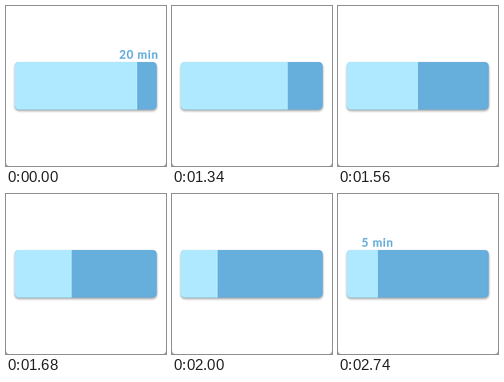
Animation of 200 by 200 pixels, one loop 4080 ms. Source, as an HTML page:

```html
<!DOCTYPE html>
<html lang="en">
<head>
<meta charset="utf-8">
<style>
html, body { margin: 0; width: 100%; height: 100%; overflow: hidden; background: #fff; }
svg { display: block; width: 100%; height: 100%; }
text { font: 700 14.5px Lato, sans-serif; letter-spacing: .8px; fill: #67add9; stroke: #67add9; stroke-width: .2; stroke-linejoin: round; }
</style>
</head>
<body>
<svg viewBox="0 0 200 200">
  <defs>
    <clipPath id="bar"><rect x="11" y="70" width="177.5" height="59.4" rx="5"/></clipPath>
    <filter id="blur" x="-10%" y="-20%" width="120%" height="150%"><feGaussianBlur stdDeviation="1.7"/></filter>
  </defs>
  <rect width="200" height="200" fill="#fff"/>
  <path d="M0 195.5V200H4.5A4.5 4.5 0 0 1 0 195.5ZM200 195.5V200H195.5A4.5 4.5 0 0 0 200 195.5Z" fill="#aaa"/>
  <rect x="11" y="71.8" width="177.5" height="59.4" rx="5" fill="#000" opacity=".38" filter="url(#blur)"/>
  <g clip-path="url(#bar)">
    <rect x="11" y="70" width="178" height="60" fill="#66aedc"/>
    <rect id="rest" x="11" y="70" width="153" height="60" fill="#aee9ff"/>
  </g>
  <text id="before" x="141.6" y="66">20 min</text>
  <text id="after" x="29.6" y="66">5 min</text>
</svg>
<script>
const LOOP = 4080, STEP = 20;
const MOVE = { start: 1170, length: 1200, from: 164, to: 49.9 };
const $ = id => document.getElementById(id);
const rest = $('rest'), before = $('before'), after = $('after');

// cubic-bezier(.25, .1, .25, 1)
function ease(x) {
  if (x <= 0) return 0;
  if (x >= 1) return 1;
  let lo = 0, hi = 1, s = x;
  for (let i = 0; i < 24; i++) {
    s = (lo + hi) / 2;
    if (.75 * s * (1 - s) + s ** 3 < x) lo = s; else hi = s;
  }
  const r = 1 - s;
  return .3 * r * r * s + 3 * r * s * s + s ** 3;
}

function show(el, on) {
  el.setAttribute('visibility', on ? 'visible' : 'hidden');
}

function draw(ms) {
  const t = Math.floor((ms % LOOP) / STEP) * STEP;
  const edge = MOVE.from + (MOVE.to - MOVE.from) * ease((t - MOVE.start) / MOVE.length);
  rest.setAttribute('width', edge - 11);
  show(before, t < 1180);
  show(after, t >= 2740);
}

let origin = null;
function tick(now) {
  if (origin === null) origin = now;
  draw(now - origin);
  requestAnimationFrame(tick);
}
draw(0);
requestAnimationFrame(tick);
</script>
</body>
</html>
```
